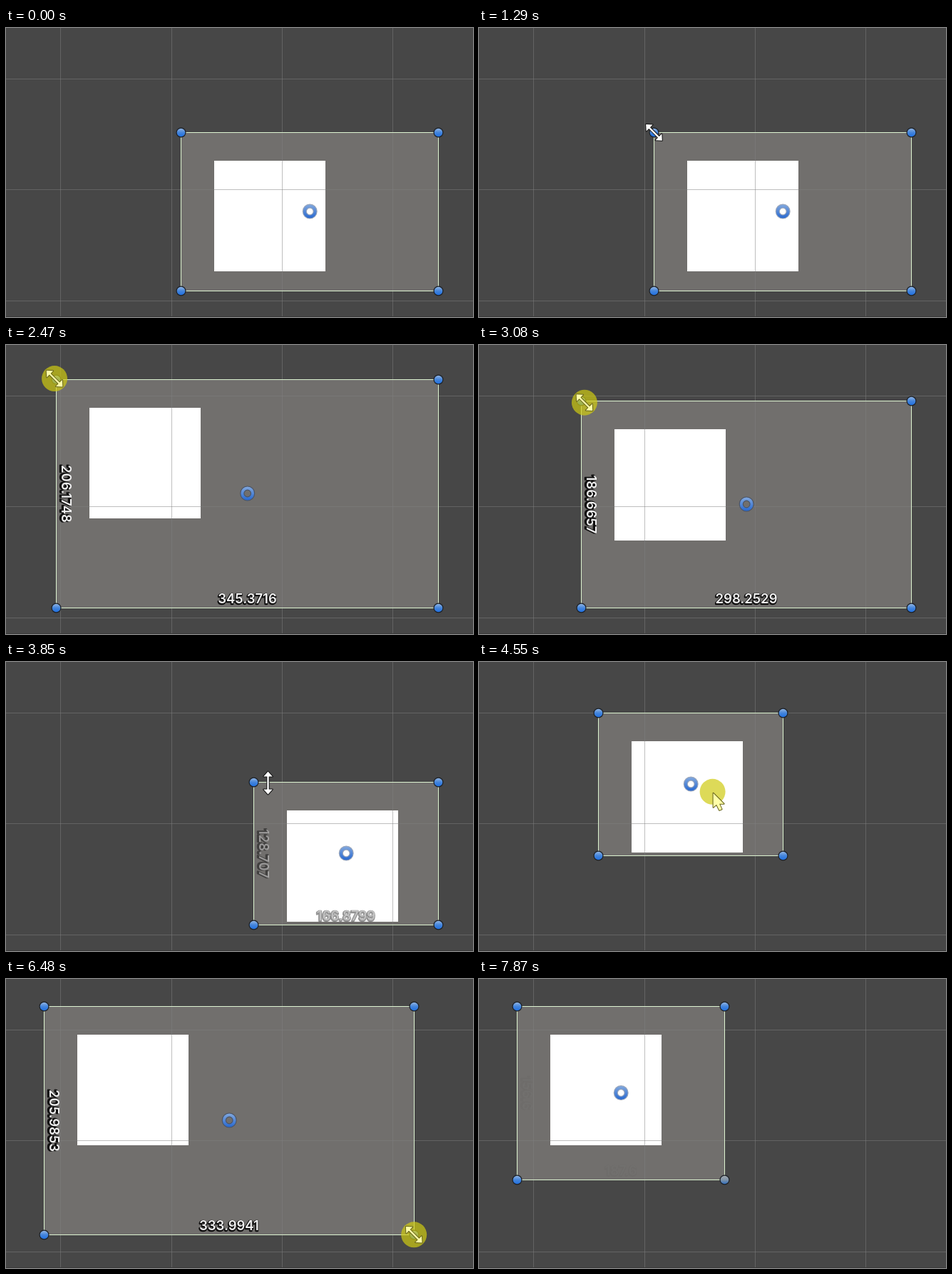
Animation, 655 px wide and 405 px high, one loop 8.07 s. Source, as an HTML page with a canvas:

```html
<!DOCTYPE html>
<html lang="en">
<head>
<meta charset="utf-8">
<title>Resizing a rectangle</title>
<style>
  html, body { margin: 0; width: 100%; height: 100%; overflow: hidden; background: #474747; }
  canvas { display: block; }
</style>
</head>
<body>
<canvas id="stage" width="655" height="405"></canvas>
<script>
const c = document.getElementById('stage').getContext('2d');
const LOOP = 8070, STEP = 70, LEAD = 12, SCALE = 1.553, CELL = 155.4;

// Turning points of the two corner drags: time, width, height in world units
const SIZE = [
  [1480, 232.4531, 143], [1950, 290.5251, 174.108], [2610, 364.4, 217.3],
  [2880, 364.4, 217.3], [3070, 298.2529, 186.6657], [3600, 166.8799, 128.707],
  [5700, 166.8799, 128.707], [6430, 333.9941, 205.9853], [6640, 333.9941, 205.9853],
  [7380, 187.6, 156.6]
];
const EDGE_HOVER = [367.5, 169.5], REST = [335.5, 240];

const clamp = v => Math.max(0, Math.min(1, v));
const ramp = (t, a, b) => clamp((t - a) / (b - a));
const mix = (a, b, p) => p === 1 ? b : a + (b - a) * p;
const glide = (a, b, p) => a.map((v, i) => mix(v, b[i], p));
const snap = v => Math.floor(v + 0.01) + 0.5;

function size(t) {
  const i = SIZE.findIndex(k => k[0] >= t);
  if (i < 1) return SIZE.at(i).slice(1);
  const [a, b] = [SIZE[i - 1], SIZE[i]];
  return glide(a, b, ramp(t, a[0], b[0])).slice(1);
}

function box(t) {
  const [w, h] = size(t);
  let x = 606.5 - w * SCALE, y = 368.5 - h * SCALE;
  if (t > 4000) {
    // carried to the top left, swung out and back, then settled
    const carry = ramp(t, 4000, 4330), settle = ramp(t, 4960, 5100);
    const swing = Math.sin(Math.PI * ramp(t, 4330, 4760)) ** 2;
    x = mix(347.3, 10, carry) + 158 * swing + 43.5 * settle;
    y = mix(168.6, 4, carry) + 68 * swing + 34.4 * settle;
  }
  return { w, h, x, y, r: x + w * SCALE, b: y + h * SCALE };
}

function pointer(t) {
  const { x, y, r, b } = box(t + LEAD);
  const grip = [x + 160, y + 110];
  if (t < 1290) return glide([622, 396], [x, y], ramp(t, 390, 1090));
  if (t < 3850) return glide([x, y], EDGE_HOVER, ramp(t, 3700, 3840));
  if (t < 4000) return glide(EDGE_HOVER, grip, ramp(t, 3850, 4000));
  if (t < 5400) return glide(grip, REST, ramp(t, 5100, 5310));
  if (t < 7450) return glide(REST, [r, b], ramp(t, 5400, 5520));
  return glide([r, b], [660, 408], ramp(t, 7450, 7720));
}

// Turn of the resize arrow over an edge or corner, or null elsewhere
function resizeAngle(px, py, { x, y, r, b }) {
  const near = (v, edge) => Math.abs(v - edge) < 11;
  const inside = px > x - 11 && px < r + 11 && py > y - 11 && py < b + 11;
  const side = near(px, x) || near(px, r), level = near(py, y) || near(py, b);
  if (!inside || !(side || level)) return null;
  if (!side) return 0;
  if (!level) return Math.PI / 2;
  return near(px, x) === near(py, y) ? -Math.PI / 4 : Math.PI / 4;
}

function disc(x, y, r, fill) {
  c.fillStyle = fill;
  c.beginPath();
  c.arc(x, y, r, 0, 7);
  c.fill();
}

function ring(x, y, r, width, stroke) {
  c.strokeStyle = stroke;
  c.lineWidth = width;
  c.beginPath();
  c.arc(x, y, r, 0, 7);
  c.stroke();
}

function shade(y, r, ...colors) {
  const g = c.createLinearGradient(0, y - r, 0, y + r);
  colors.forEach((color, i) => g.addColorStop(i / (colors.length - 1), color));
  return g;
}

function handle(x, y, dull) {
  disc(x, y, 7, '#1b2027');
  disc(x, y, 5.8, dull ? shade(y, 6, '#a4a9ae', '#7f93a8', '#2f6fc0')
                       : shade(y, 6, '#94b6e2', '#4485dc', '#1f6fe0'));
}

function pivot(x, y) {
  ring(x, y, 7.4, 6.2, 'rgba(20,45,90,.42)');
  ring(x, y, 7.4, 4, shade(y, 9, '#7fa6dd', '#2a6ad0'));
}

function label(value, x, y, angle, alpha) {
  const text = parseFloat(value.toPrecision(7));
  c.save();
  c.translate(x, y);
  c.rotate(angle);
  c.globalAlpha = alpha;
  c.font = '600 18.5px Inter, "Liberation Sans", sans-serif';
  c.textAlign = 'center';
  c.lineJoin = 'round';
  c.lineWidth = 2.5;
  c.strokeStyle = 'rgba(0,0,0,.85)';
  c.strokeText(text, -0.5, 6.5);
  c.fillStyle = '#f0f0f0';
  c.fillText(text, 0, 5);
  c.restore();
}

function polygon(points) {
  c.beginPath();
  points.forEach(p => c.lineTo(...p));
  c.closePath();
  c.lineJoin = 'round';
  c.lineWidth = 2;
  c.stroke();
  c.fill();
}

function cursor(x, y, angle, pressed) {
  c.save();
  c.translate(x, y);
  c.strokeStyle = pressed ? '#66631a' : '#111';
  c.fillStyle = pressed ? '#ffffa8' : '#fff';
  if (angle === null) {
    polygon([[1, 2], [1, 22], [5.5, 18], [9.5, 26], [13, 24.5], [9.5, 17], [16, 17]]);
  } else {
    c.rotate(angle);
    const half = [[0, -16], [6.3, -9], [1.2, -9], [1.2, 9], [6.3, 9], [0, 16]];
    polygon([...half, ...half.slice(1, 5).reverse().map(([px, py]) => [-px, py])]);
  }
  c.restore();
}

function grid() {
  c.fillStyle = 'rgba(128,128,128,.5)';
  for (let i = 0; i < 4; i++) {
    c.fillRect(Math.round(76.2 + i * CELL), 0, 1, 405);
    c.fillRect(0, Math.round(71 + i * CELL), 655, 1);
  }
  c.fillStyle = '#393939';
  c.fillRect(0, 404, 655, 1);
}

function draw(t) {
  const now = box(t), { w, h, x, y } = now;
  const [l, top, r, b] = [x, y, now.r, now.b].map(snap);
  const cx = (l + r) / 2, cy = (top + b) / 2;

  c.fillStyle = '#474747';
  c.fillRect(0, 0, 655, 405);
  c.fillStyle = '#716f6d';
  c.fillRect(l, top, r - l, b - top);
  c.fillStyle = '#fff';
  const head = Math.round(y + 39.5), foot = Math.round(y + 195);
  c.fillRect(l + 46.5, head, 156, foot - head);
  grid();

  c.strokeStyle = '#def5d2';
  c.lineWidth = 1;
  c.strokeRect(l, top, r - l, b - top);
  handle(l, top);
  handle(r, top);
  handle(l, b);
  handle(r, b, t > 7450);
  pivot(cx + 0.2, cy - 0.5);

  // sizes show during a corner drag and fade after it
  const alpha = t < 5000 ? (t > 1450) * (1 - ramp(t, 3740, 3940))
                         : (t > 5700) * (1 - ramp(t, 7480, 7840));
  if (alpha) {
    label(w, cx, b - 12, 0, alpha);
    label(h, l + 12, cy, Math.PI / 2, alpha);
  }

  if (t < 380 || t > 7700) return;
  const [px, py] = pointer(t);
  const press = [[1270, 3640], [3950, 5100], [5640, 7400]].find(([on, off]) => t > on && t < off);
  if (press) disc(px, py, 18, `rgba(207,203,18,${0.7 * ramp(t, press[0] - 70, press[0] + 70)})`);
  cursor(px, py, resizeAngle(px, py, now), press);
}

function frame() {
  const t = performance.now() % LOOP;
  draw(Math.floor((t + 10) / STEP) * STEP - 10);
  requestAnimationFrame(frame);
}
frame();
</script>
</body>
</html>
```
